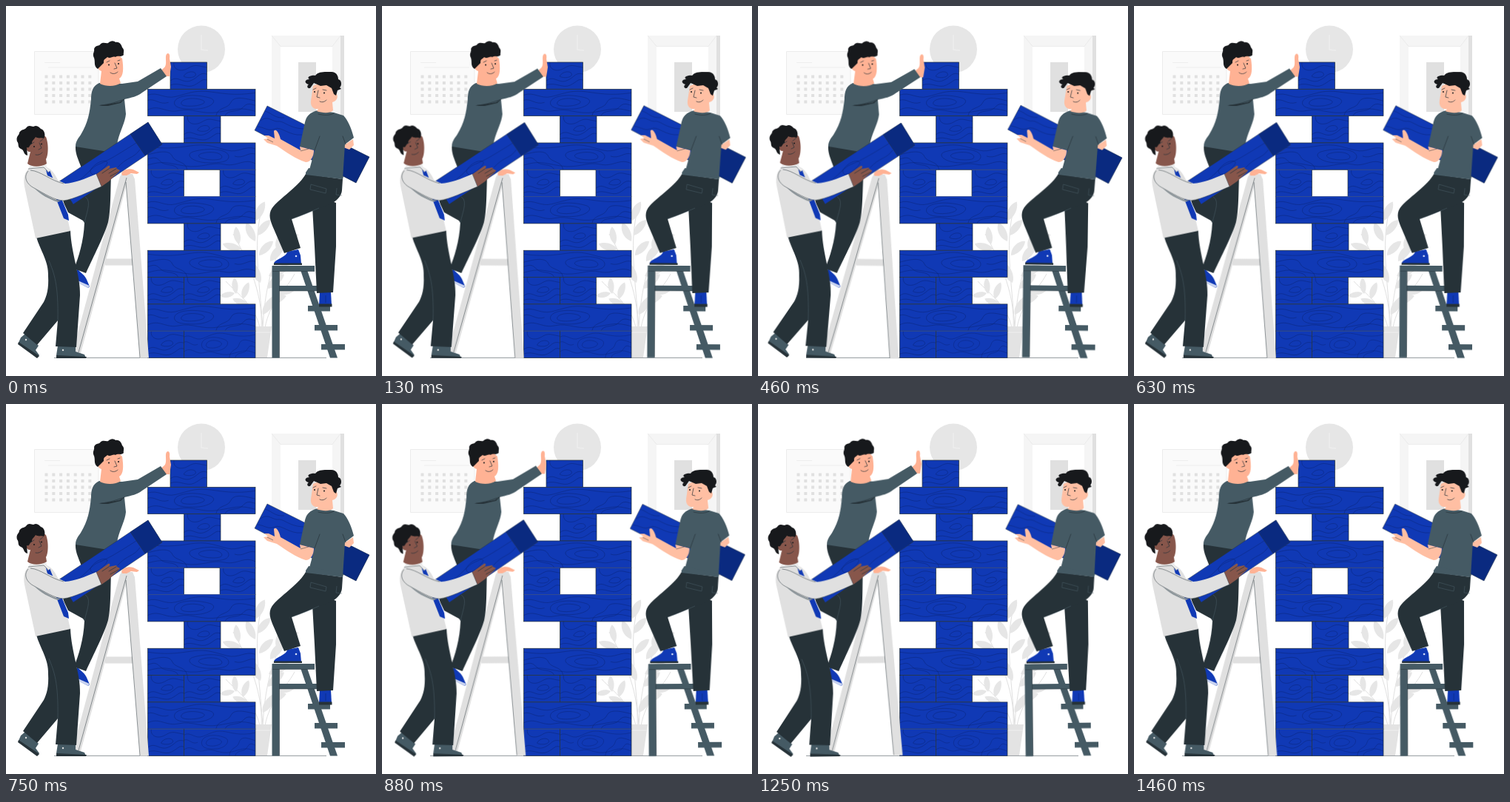
Animation of 500x500 px, one loop 1.5 s. Source, as an HTML page:

```html
<!DOCTYPE html>
<html lang="en">
<head>
<meta charset="utf-8">
<title>Building a tower</title>
<style>
html, body { margin: 0; width: 100%; height: 100%; overflow: hidden; background: #fff; }
svg { display: block; width: 100vw; height: 100vh; }
.blue { fill: #1039b5; }
.deep { fill: #0a2a80; }
.dark { fill: #263238; }
.slate { fill: #455a64; }
.pale { fill: #e0e0e0; }
.hair { fill: #17191c; }
.peach { fill: #ffbfa3; }
.rosy { fill: #ffb294; }
.brown { fill: #87564b; }
.ink { fill: none; stroke: #263238; stroke-width: .7; stroke-linecap: round; stroke-linejoin: round; }
.thin { fill: none; stroke: #263238; stroke-width: .5; }
.grain { fill: none; stroke: #0a2475; stroke-width: .5; }
.fold { fill: none; stroke: #4d616b; stroke-width: .5; }
</style>
</head>
<body>
<svg viewBox="0 0 500 500">
  <defs>
    <g id="long" class="grain">
      <path d="M0 8C14 3 22 14 38 10S62 2 78 3 112 10 145 5M0 28C16 20 24 33 42 29S72 35 96 31 124 24 145 30"/>
      <path d="M36 20C34 9 60 5 84 12 96 16 84 27 62 27 48 27 38 26 36 20ZM45 19C46 12 64 11 74 15 82 19 68 23 58 23 50 23 45 22 45 19Z"/>
      <path d="M92 36C94 24 108 27 112 18S130 12 145 16M104 36C108 27 122 32 128 25S138 20 145 22M0 15C10 12 16 22 28 18"/>
    </g>
    <g id="short" class="grain">
      <path d="M0 25C10 17 16 29 27 25S38 13 49 16M5 0C3 10 14 14 24 8S36 5 49 7M0 31C12 26 22 36 32 31S42 22 49 24"/>
      <path d="M18 19C21 12 33 11 34 16S22 22 18 19Z"/>
    </g>
  </defs>

  <g id="room">
    <path d="M38.500 61.500H125V146.500H38.500Z" fill="#fafafa" stroke="#e6e6e6" stroke-width=".7"/>
    <path d="M52 76.500H73M57 83H118" stroke="#ebebeb" stroke-width=".8"/>
    <g id="days" class="pale"></g>
    <circle cx="264" cy="58.500" r="32" fill="#e6e6e6"/>
    <path d="M264 39V59L273 60" fill="none" stroke="#ededed" stroke-width="1.500"/>
    <path d="M359 40H457V178H359Z" fill="#f5f5f5"/>
    <path d="M452 40H457V178H452Z" class="pale"/>
    <path d="M371 54.500H441V166H371Z" fill="#fff"/>
    <path d="M359 40L371 54.500H441L452 40" fill="none" stroke="#e3e3e3" stroke-width=".6"/>
    <path d="M395 76H419V143H395Z" class="pale"/>
    <g id="plant" fill="#e6e6e6"></g>
    <path d="M332 433H359L353 475H334Z" fill="#e3e3e3"/>
    <path d="M332 441H358" stroke="#f2f2f2" stroke-width=".8"/>
    <path d="M65 475.400H433" class="thin"/>
  </g>

  <g id="tower"></g>

  <g id="left">
    <g id="stepladder">
      <path d="M134 341.500H174V350.500H134Z" class="pale"/>
      <path d="M154 230L163 228 165 234 101 469 99 475.500H88L91 464Z" class="pale"/>
      <path d="M154 231L156 227H171L174 234 193 475.500H181L162 236Z" class="pale"/>
      <path d="M163 232L98 468M162 238L181 475" class="thin"/>
    </g>

    <g id="climber">
      <path d="M156 226C159 221 166 219 172 221L180 225 177 227 169 226 163 229 157 229Z" class="rosy"/>
      <path d="M96 355C101 361 107 363 110 372L113 379 111 381 98 374 95 368Z" class="blue"/>
      <path d="M97 371L113 378 111 381 97 374Z" fill="#c9d3ef"/>
      <path d="M94 189C93 205 104 215 107 240L108 256 76 262 84 279 104 290 106 293C105 318 98 340 92 355L108 361C118 339 133 310 138 292 143 270 140 238 144 197Z" class="dark"/>
      <path d="M107 258C116 263 109 279 106 293" class="fold"/>
      <path d="M213 84C219 80 214 69 217 65 220 62 222 66 221 71L223 82 221 95 213 95 208 88Z" class="rosy"/>
      <path d="M126 104C117 108 115 116 115 126 113 145 111 157 101 174 96 181 94 184 94 190L144 198C148 193 150 189 151 182 155 167 161 157 162 146L160 126C169 124 178 122 184 117L217 95 209 84 178 102 157 105Z" class="slate"/>
      <path d="M128 134C141 133 151 129 160 126" class="ink"/>
      <path d="M125 135L153 130 160 126 155 131 138 135Z" class="dark"/>
      <path d="M126 79C122 80 124 87 129 88L127 105C135 109 148 109 155 104L153 98C159 95 159 84 157 71L150 64 132 67Z" class="rosy"/>
      <path d="M124 85C118 81 121 76 119 70 116 64 120 63 119 58 121 52 126 55 128 51 132 48 135 51 138 50 142 46 146 47 148 49 154 48 156 53 157 56 161 60 158 63 159 66 155 70 152 66 148 69 144 67 141 72 137 69 133 73 132 71 132 77 129 80 128 83Z" class="hair"/>
      <path d="M147 77L150 84 146 85M141 90C145 93 149 91 151 89M136 76L140 74M151 74L154 73" class="ink"/>
      <circle cx="139" cy="79.500" r="1" class="hair"/><circle cx="152" cy="78" r="1" class="hair"/>
    </g>

    <g id="carrier">
      <path d="M192 157L211 187 91 268 72 237Z" class="blue"/>
      <path d="M192 157L211 187 188 202 168 173Z" class="deep"/>
      <path d="M168 173L188 202M192 157L211 187 91 268M192 157L72 237" class="thin"/>
      <path d="M88 240C102 239 114 218 125 214S151 201 176 185M114 222C122 208 141 206 136 214S114 235 114 222M98 257C110 246 123 242 131 233M151 218C163 204 173 206 181 194" class="grain"/>

      <path d="M26 443L20 448 17 455 42 475 45 472 40 465 44 459Z" class="slate"/>
      <path d="M17 454L45 473 42 476 16 457Z" fill="#263238"/>
      <path d="M70 459L68 472V475.500H108L106 471 94 467V459Z" class="slate"/>
      <path d="M68 472L109 474 108 476H68Z" class="dark"/>
      <circle cx="77" cy="465" r="1.200" class="pale"/><circle cx="27" cy="451" r="1.200" class="pale"/>
      <path d="M41 312C46 330 58 345 57 365 58 382 55 392 51 400L23 442 42 458 70 425 67 460 95 461 100 391C101 365 88 335 87 303Z" class="dark"/>
      <path d="M58 344C65 361 71 376 70 425" class="fold"/>

      <path d="M34 218C25 222 23 233 25 244L40 314 87 304 83 287 72 240C68 229 62 220 53 217Z" class="pale"/>
      <path d="M53 218L59 222 63 232 84 282 85 290 78 287 57 233Z" class="blue"/>
      <path d="M31 218L35 212 54 212 55 218 60 222 57 225 51 218 33 222Z" fill="#ebebeb"/>
      <path d="M30 220L51 218 58 225" class="thin"/>
      <path d="M28 189C26 193 29 198 33 197L29 213C35 218 47 218 55 213L54 207C57 203 58 187 54 177L47 172 33 176Z" class="brown"/>
      <path d="M29 202C23 201 25 194 20 193 15 191 18 186 15 183 13 176 18 175 18 171 21 166 24 168 27 165 31 160 34 163 37 163 42 160 45 164 47 166 52 167 54 175 51 179 47 177 45 180 40 177 37 182 35 181 35 186 31 188 32 193 28 191Z" class="hair"/>
      <path d="M45 185L48 192 44 194M40 201C44 202 47 200 49 198M33 187L38 184M46 183L50 180" class="ink"/>
      <circle cx="38" cy="190" r="1" class="hair"/><circle cx="48" cy="186.500" r="1" class="hair"/>

      <path d="M121 228L138 216C141 215 141 218 139 220L149 218 150 220 154 222 152 225 146 230 139 237 129 244Z" class="brown"/>
      <path d="M139 220L130 226M149 220L139 226M152 224L141 230" class="ink"/>
      <path d="M29 223C23 230 27 241 38 246 51 253 66 263 78 263 92 261 112 251 129 244L122 227C106 234 93 239 80 240L47 225C40 221 33 219 29 223Z" class="pale"/>
      <path d="M30 223C23 231 28 241 38 246 51 253 66 263 78 263 92 261 112 251 129 244L122 227M33 222C47 223 60 236 78 240" class="thin"/>
      <path d="M38 246C51 253 62 262 74 263L70 265C58 261 47 255 38 246Z" fill="#8b9499"/>
    </g>
  </g>

  <g id="right">
    <g class="slate">
      <path d="M398 357H407L448 475.500H438Z"/>
      <path d="M359.500 351H369.500V475.500H359.500ZM360 351H417V358.500H360ZM369 378H428V385H369ZM408 405H438V412.500H408ZM417 431H448V438.500H417ZM426 457H458V464.500H426Z"/>
    </g>
    <path d="M369.500 359V475M360 358.500H417M369 385H428" class="thin"/>

    <path d="M353 135L491 204 473 239 336 168Z" class="blue"/>
    <path d="M447 182L491 204 473 239 434 219Z" class="deep"/>
    <path d="M336 168L353 135 491 204 473 239Z" class="thin"/>
    <path d="M344 155C354 147 360 157 368 156S383 166 404 166M350 142C360 145 363 152 376 151M340 163C350 164 354 170 363 166S383 176 400 174" class="grain"/>
    <path d="M457 188L469 180 470 188 464 194 456 191Z" class="peach"/>

    <path d="M424 387L423 404H440L439 387Z" class="blue"/>
    <path d="M423 402.500H440.500V406.500H423Z" class="dark"/>
    <path d="M380 332C379 340 362 342 362 349H399L398 337 395 329Z" class="blue"/>
    <path d="M362 347.500H400V350H362Z" class="dark"/>
    <circle cx="392" cy="338" r="1.300" fill="#dce4fa"/>
    <path d="M432 391V401" stroke="#0a2a80" stroke-width=".7"/>
    <path d="M414 271L417 325 420 388 442 387 446 325 446 266 425 258Z" class="dark"/>
    <path d="M405 227C397 242 374 257 362 270 354 279 356 287 360 297L376 334 398 327 386 288C400 283 412 278 423 273 440 269 453 261 454 249L455 234Z" class="dark"/>
    <path d="M386 288C400 283 412 278 423 273M412 241L433 247 432 253 411 248ZM447 246L446 255 454 256" class="fold"/>

    <path d="M421 141C410 144 406 149 404 157L397 190 417 195 409 225 455 234 458 187 470 178C467 166 462 154 456 148L443 144Z" class="slate"/>
    <path d="M405 225L409 219 456 230 455 234 405 228Z" class="slate"/>
    <path d="M422 146C430 148 438 148 443 145M417 195L424 176M459 187L455 176" class="ink"/>
    <path d="M397 190L416 195C416 203 412 211 405 211 392 207 378 197 366 189L353 185 348 180 354 179 349 175 355 175 363 179 362 169C365 165 369 172 371 180L398 195Z" class="peach"/>
    <path d="M353 180L361 184M398 196L409 193" class="thin"/>

    <path d="M415 108L412 128C411 136 416 140 422 139L420 142C428 145 439 145 442 141L441 130C447 129 450 122 446 118L443 109 429 102Z" class="peach"/>
    <path d="M411 111C407 112 406 108 409 106 402 104 404 99 410 99 405 96 413 93 418 94 422 88 432 89 438 89 446 88 449 94 449 99 454 100 454 108 451 110L453 112 448 114 446 121 443 119 440 111 433 107 425 108 416 104Z" class="hair"/>
    <path d="M422 114L420 123 424 124M424 129C428 131 431 129 433 127M415 113L419 111M428 113L433 114" class="ink"/>
    <circle cx="417" cy="116" r="1" class="hair"/><circle cx="430" cy="117.500" r="1" class="hair"/>
  </g>
</svg>
<script>
const $ = id => document.getElementById(id);

function add(parent, tag, attrs) {
  const el = document.createElementNS('http://www.w3.org/2000/svg', tag);
  for (const k in attrs) el.setAttribute(k, attrs[k]);
  return parent.appendChild(el);
}

for (let i = 0; i < 35; i++) {
  add($('days'), 'rect', { x: 52.5 + i % 7 * 9.8, y: 93.5 + Math.floor(i / 7) * 8.5, width: 4, height: 4 });
}

// Stems, then leaves as x, y, angle, length
add($('plant'), 'path', {
  d: 'M345 435C348 385 322 335 307 308M347 435C342 365 333 315 347 270M347 435C350 372 365 330 386 304M343 435C337 405 314 390 297 372M350 435C356 400 378 385 390 362',
  fill: 'none', stroke: '#e0e0e0', 'stroke-width': 1
});
const leaves = [
  [338, 290, -65, 28], [340, 310, -50, 27], [337, 318, -115, 28], [342, 337, -45, 27],
  [318, 328, -165, 26], [315, 322, -100, 24], [326, 345, -150, 24], [357, 345, -50, 30],
  [366, 330, -70, 26], [372, 320, -25, 26], [355, 365, -25, 32], [353, 382, -40, 30],
  [365, 388, -8, 25], [351, 403, -22, 30], [344, 374, -110, 28], [311, 389, -95, 22],
  [320, 396, -70, 24], [309, 388, 170, 20], [327, 403, -160, 22], [347, 417, -55, 28]
];
for (const [x, y, a, n] of leaves) {
  add($('plant'), 'path', {
    d: `M0 0C${n * .3} ${-n * .32} ${n * .8} ${-n * .25} ${n} 0C${n * .7} ${n * .22} ${n * .25} ${n * .2} 0 0`,
    transform: `translate(${x} ${y}) rotate(${a})`
  });
}

// Blocks as x, row, width
const blocks = [
  [222, 0, 49.5], [191.5, 1, 145.5], [240.5, 2, 49.5], [191.5, 3, 145.5],
  [191.5, 4, 49], [289, 4, 48], [191.5, 5, 145.5], [240.5, 6, 49.5],
  [191.5, 7, 145.5], [191.5, 8, 49], [240.5, 8, 49], [191.5, 9, 145.5],
  [191.5, 10, 49], [240.5, 10, 96.5]
];
const step = 36.32;
blocks.forEach(([x, row, w], i) => {
  const g = add($('tower'), 'g', { transform: `translate(${x} ${76 + row * step})` });
  add(g, 'rect', { width: w, height: step, class: 'blue' });
  const flip = row % 4 === 3 ? `translate(${w} 0) scale(-1 1) ` : '';
  add(g, 'use', { href: w > 50 ? '#long' : '#short', transform: flip + `scale(${w > 50 ? w / 145 : w / 49} 1)` });
  add(g, 'rect', { width: w, height: step, fill: 'none', stroke: '#263238', 'stroke-width': .7 });
  if ([4, 5, 10].includes(row)) add(g, 'path', { d: `M0 0H${w}`, stroke: '#3858b8', 'stroke-width': .7 });
});

function sway(id, x, y) {
  $(id).style.transformOrigin = `${x}px ${y}px`;
  $(id).animate([[0, 0], [.25, 1], [.75, -1], [1, 0]].map(([offset, deg]) =>
    ({ offset, transform: `rotate(${deg}deg)` })), { duration: 1500, iterations: Infinity });
}
sway('left', 118, 261.5);
sway('right', 413.5, 282);
</script>
</body>
</html>
```
